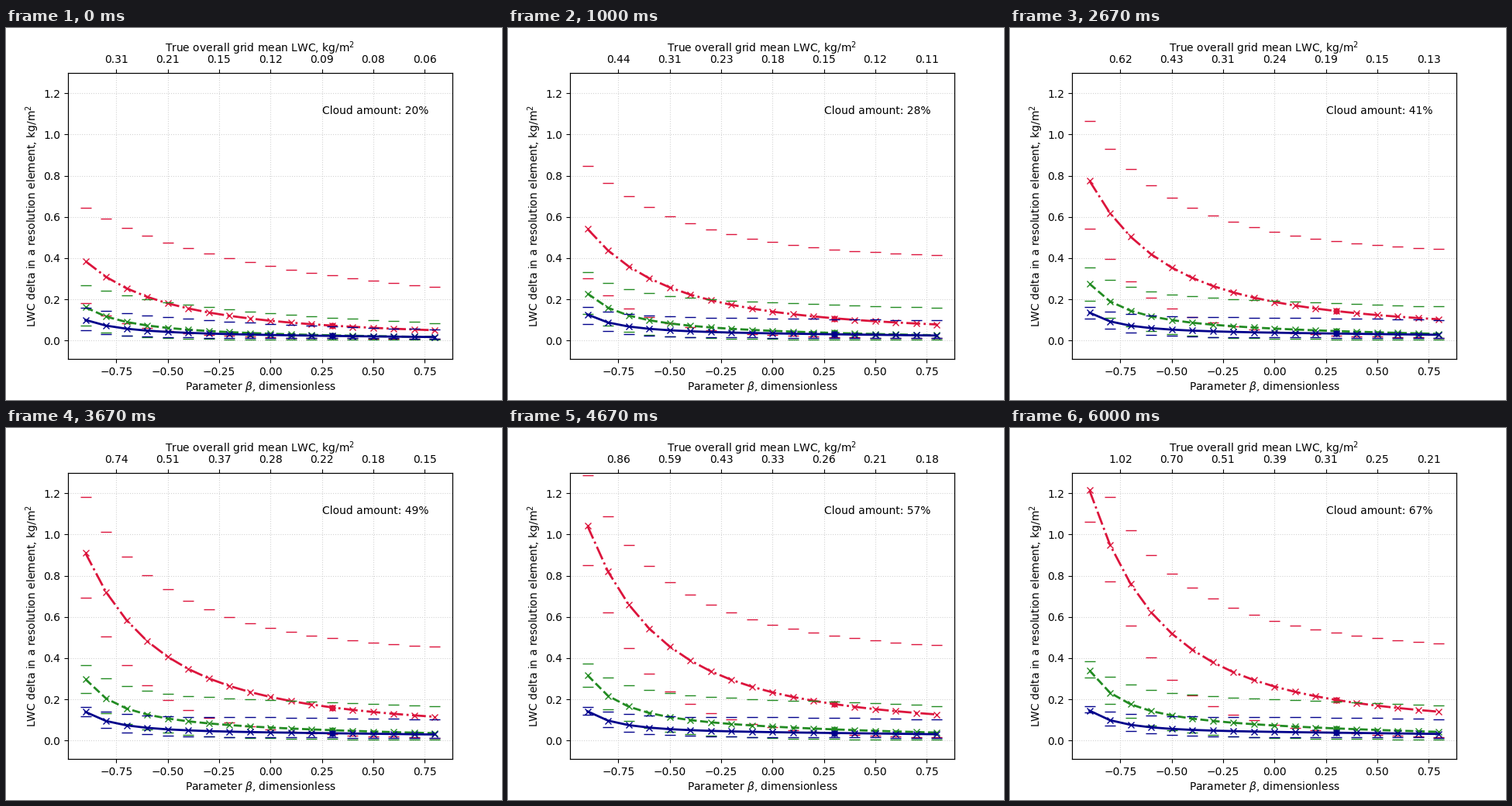
Write a matplotlib script that moves like this. It is 640x480 px and loops after 6330 ms.

```python
import numpy as np
import matplotlib.pyplot as plt
from matplotlib.animation import FuncAnimation

FRAMES = 19
LOOP_MS = 6330

beta = np.linspace(-0.9, 0.8, 18)
beta_ticks = np.linspace(-0.75, 0.75, 7)
REFERENCE = 12  # index of the highlighted beta = 0.3


def log_shifted(b):
    return np.log(np.asarray(b) + 1.5)


u = log_shifted(beta)
u_nodes = log_shifted([-0.9, -0.6, 0.0, 0.8])


def curve(start, end, powers, t):
    """Smooth log-log curve through four nodes that ease from start to end."""
    power = np.interp(u_nodes, u_nodes[[0, -1]], powers)
    y = np.array(start) + np.subtract(end, start) * t ** power
    return np.exp(np.polyval(np.polyfit(u_nodes, np.log(y), 3), u))


def cloud_amount(step):
    return 0.2 + 0.0263 * step


def grid_mean(b, step):
    profile = 0.579 * np.exp(-b + 0.31 * b**2 - 0.09 * b**3)
    bump = 0.0185 * np.exp(-((step - 3.5) / 2.4) ** 2)
    return cloud_amount(step) * profile + bump


fig, ax = plt.subplots(figsize=(6.4, 4.8), dpi=100)
ax.set_xlim(-0.985, 0.885)
ax.set_ylim(-0.09, 1.3)
ax.grid(linestyle=":", color="lightgray")
ax.set_xlabel(r"Parameter $\beta$, dimensionless", labelpad=2)
ax.set_ylabel("LWC delta in a resolution element, kg/m$^2$", labelpad=2)
cloud_text = ax.text(0.25, 1.1, "")

top = ax.twiny()
top.set_xlim(ax.get_xlim())
top.set_xticks(beta_ticks)
top.set_xlabel("True overall grid mean LWC, kg/m$^2$", labelpad=2)


class Series:
    """A mean line with upper and lower bounds, each as (start, end, powers)."""

    def __init__(self, color, style, mean, high, low):
        self.mean, self.bounds = mean, (high, low)
        blank = np.zeros_like(beta)
        self.line, = ax.plot(beta, blank, style, color=color, lw=2, marker="x")
        self.caps = [ax.plot(beta, blank, "_", color=color, ms=10)[0]
                     for _ in self.bounds]
        self.dot, = ax.plot([beta[REFERENCE]], [0], "o", color=color, ms=5)

    def update(self, t):
        y = curve(*self.mean, t)
        self.line.set_ydata(y)
        self.dot.set_ydata([y[REFERENCE]])
        for cap, bound in zip(self.caps, self.bounds):
            cap.set_ydata(curve(*bound, t))


series = [
    Series("crimson", "-.",
           mean=([.385, .212, .096, .050], [1.214, .622, .262, .140], (.93, .65)),
           high=([.643, .508, .361, .260], [1.420, .900, .582, .472], (.75, .17)),
           low=([.180, .060, .016, .009], [1.063, .404, .077, .017], (1.1, .9))),
    Series("forestgreen", "--",
           mean=([.161, .073, .033, .017], [.340, .143, .073, .042], (.55, .6)),
           high=([.268, .202, .133, .085], [.385, .247, .201, .170], (.35, .08)),
           low=([.073, .017, .005, .003], [.304, .073, .014, .005], (.8, 1))),
    Series("darkblue", "-",
           mean=([.100, .048, .027, .017], [.145, .064, .042, .032], (.3, .4)),
           high=([.158, .121, .081, .053], [.165, .121, .114, .102], (.3, .05)),
           low=([.051, .018, .012, .010], [.138, .034, .017, .014], (.6, .6))),
]


def update(step):
    for s in series:
        s.update(step / (FRAMES - 1))
    cloud_text.set_text(f"Cloud amount: {cloud_amount(step):.0%}")
    top.set_xticklabels([f"{v:.2f}" for v in grid_mean(beta_ticks, step)])


anim = FuncAnimation(fig, update, frames=FRAMES, init_func=lambda: update(0),
                     interval=LOOP_MS / FRAMES, repeat=True, repeat_delay=0)
plt.show()
```
